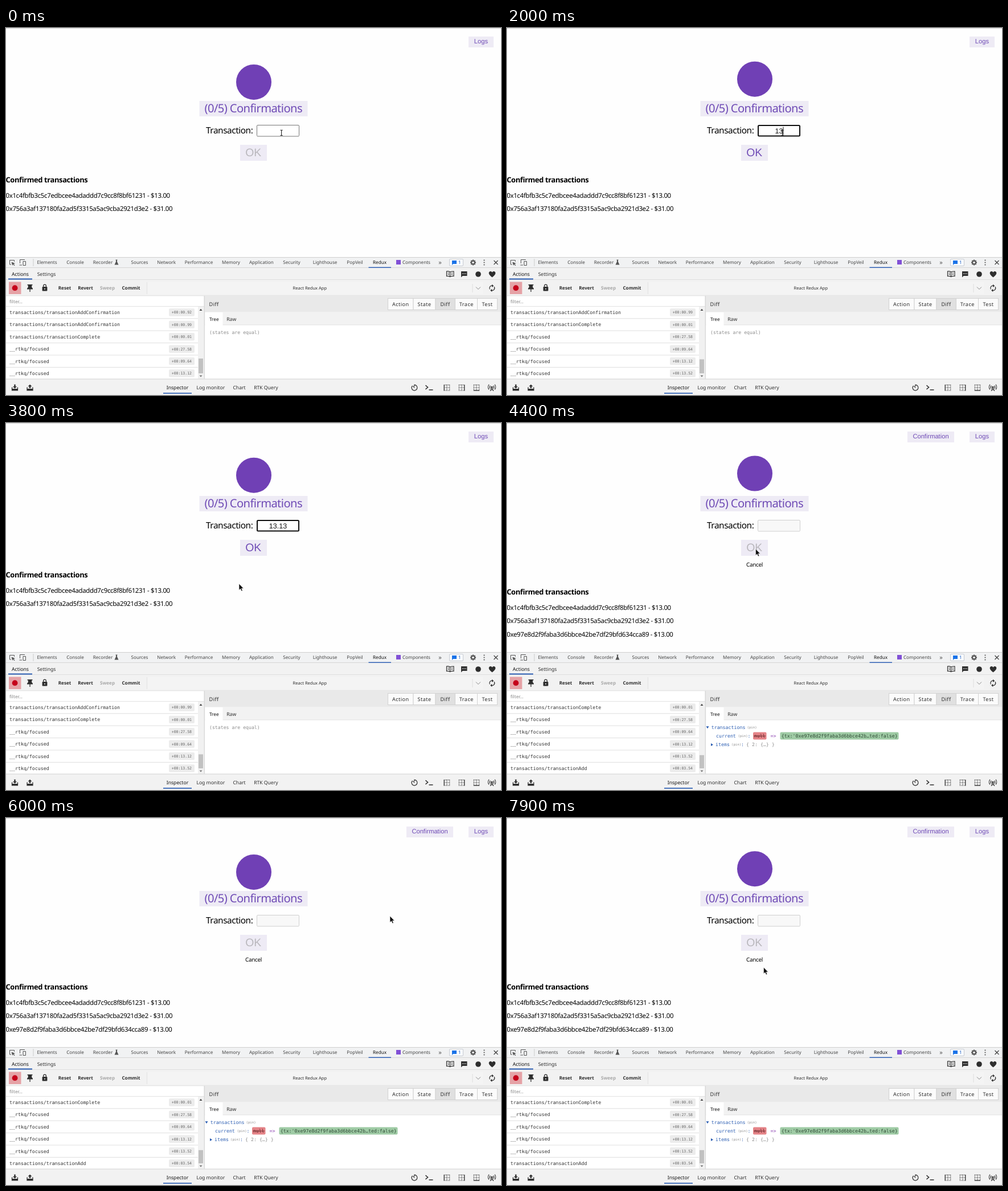
An HTML page that plays this animation: 869 px wide and 644 px high, repeating every 8 s.

```html
<!DOCTYPE html>
<html lang="en">
<head>
<meta charset="utf-8">
<title>Transaction confirmations</title>
<style>
  html, body { margin: 0; width: 100%; height: 100%; overflow: hidden; background: #fefefe; }
  svg { display: block; width: 869px; height: 644px; }
  text { font-family: "Noto Sans", "Open Sans", sans-serif; text-rendering: geometricPrecision; white-space: pre; }
  .mono { font-family: "DejaVu Sans Mono", "Noto Sans Mono", monospace; }
  .arial { font-family: "Liberation Sans", Arial, sans-serif; }
  .bold { font-weight: 700; }
  .wide { letter-spacing: .45px; }
  .tight { letter-spacing: -.03em; }
  .line { fill: none; stroke: #2e2e2e; stroke-width: 1.2; }
</style>
</head>
<body>
<svg id="stage" viewBox="0 0 869 644" xmlns="http://www.w3.org/2000/svg"></svg>
<script>
const LOOP = 8000, STEP = 100, ROW = 21.4;
const PURPLE = '#704cb6', LILAC = '#eeebf5', DARK = '#2e2e2e', BLUE = '#2d5fb3', BAR = '#f2f2f2';

const box = (x, y, w, h, fill, extra = '') =>
  `<rect x="${x}" y="${y}" width="${w}" height="${h}" fill="${fill}" ${extra}/>`;
const path = (d, extra = 'class="line"') => `<path d="${d}" ${extra}/>`;
const solid = (d, fill = DARK) => path(d, `fill="${fill}"`);
const dot = (x, y, r, fill = DARK, extra = '') => `<circle cx="${x}" cy="${y}" r="${r}" fill="${fill}" ${extra}/>`;
const at = (x, y, body) => `<g transform="translate(${x} ${y})">${body}</g>`;

// y is the middle of the capital letters
const label = (x, y, str, size, { fill = DARK, anchor = 'start', cls = '', extra = '' } = {}) =>
  `<text x="${x}" y="${(y + size * .36).toFixed(2)}" font-size="${size}" fill="${fill}" text-anchor="${anchor}" class="${cls}" ${extra}>${str}</text>`;
const mid = (x, y, str, size, opts = {}) => label(x, y, str, size, { anchor: 'middle', ...opts });
const mono = (x, y, str, size = 8.27, fill = '#333') => label(x, y, str, size, { fill, cls: 'mono' });
const arial = (x, y, str, size, fill, extra = '') => mid(x, y, str, size, { fill, cls: 'arial', extra });
const tight = (x, y, str, size, fill = '#000', cls = '') => label(x, y, str, size, { fill, cls: 'tight ' + cls });

function page() {
  const item = (y, str) => tight(-.5, y, str, 11.45);
  return box(0, 0, 869, 1.2, '#dcdcdc')
    + box(812, 15, 44, 19, LILAC) + arial(834, 23.2, 'Logs', 11.2, PURPLE)
    + dot(435, 95, 31, '#7040b5', 'id="logo"')
    + box(339.5, 128, 190, 27, LILAC)
    + tight(348.5, 140.4, '(0/5) Confirmations', 20.2, PURPLE)
    + tight(351, 179.2, 'Transaction:', 15.4)
    + box(440.5, 170.5, 74, 19.5, '#fff', 'id="field" rx="1.5"')
    + arial(477.5, 180.3, '', 12.5, '#111', 'id="value"')
    + box(0, 173.5, 1, 14, '#111', 'id="caret"')
    + box(411, 205, 47, 28, LILAC)
    + arial(434.3, 218, 'OK', 19.4, PURPLE, 'id="ok"')
    + `<g id="pending">${box(703, 15, 82, 19, LILAC)}${arial(744, 23.2, 'Confirmation', 11.15, PURPLE)}`
    + tight(420, 248.4, 'Cancel', 9.9)
    + item(370.7, '0xe97e8d2f9faba3d6bbce42be7df29bfd634cca89 - $13.00') + '</g>'
    + '<g id="list">' + tight(-.5, 266.3, 'Confirmed transactions', 12.95, '#000', 'bold')
    + item(293.6, '0x1c4fbfb3c5c7edbcee4adaddd7c9cc8f8bf61231 - $13.00')
    + item(317.1, '0x756a3af137180fa2ad5f3315a5ac9cba2921d3e2 - $31.00') + '</g>';
}

function tabBar() {
  const tabs = [['Elements', 72], ['Console', 121.5], ['Recorder', 170], ['Sources', 234.5], ['Network', 281.7],
    ['Performance', 338.5], ['Memory', 395], ['Application', 448.3], ['Security', 501.5], ['Lighthouse', 560],
    ['PopVeil', 612.5], ['Redux', 656], ['Components', 720.5]];
  const teeth = [...Array(8).keys()].map(i => `<rect x="-1.1" y="-5" width="2.2" height="3" fill="#555" transform="rotate(${i * 45})"/>`).join('');
  return box(0, 402, 869, 19, '#f1f2f3') + box(0, 402, 869, 1, '#cfcfcf') + box(0, 420, 869, 1, '#d5d5d5')
    + tabs.map(([name, x]) => mid(x, 411.2, name, 8.15, { fill: name === 'Redux' ? '#111' : '#444' })).join('')
    + box(636.5, 419.5, 39.5, 1.5, BLUE)
    + path('M9 415H6.5V407.5H14.5V410', 'fill="none" stroke="#555"') + solid('M9.5 410.5L16 413L13.4 414L15.5 416.4L14.6 417.2L12.4 414.8L11.3 417Z', '#555')
    + path('M24.5 413V406.5H33M23.5 416H28M30 409.5H34.5V416.5H30Z', 'fill="none" stroke="#555"')
    + box(47.5, 405, 1, 13, '#ccc')
    + solid('M192.5 406.5H195.5V407.5H195V410L197.5 415.5H190.5L193 410V407.5H192.5Z', '#555')
    + box(685, 407, 8, 8, '#8150d6')
    + mid(762, 410.6, '»', 11, { fill: '#555' })
    + box(778.5, 405.5, 24, 12, '#f7f9fc', 'stroke="#c8ccd2" rx="1.5"')
    + solid('M783 408H791V414H785L783 416Z', '#1a73e8') + label(794, 411.5, '1', 8, { fill: '#1a5fc4' })
    + at(820, 411.5, teeth + dot(0, 0, 2.8, 'none', 'stroke="#555" stroke-width="1.8"'))
    + [407.5, 411.5, 415.5].map(y => dot(839.5, y, 1.1, '#555')).join('')
    + path('M856.5 408L863.5 415M863.5 408L856.5 415', 'stroke="#444" stroke-width="1.3"');
}

function toolBars() {
  const bold = (x, str, fill = DARK) => mid(x, 456, str, 8.1, { fill, cls: 'bold' });
  return box(0, 421, 869, 49, BAR) + box(0, 441, 869, 1, '#dedede')
    + mid(25, 432, 'Actions', 8.7, { fill: '#111' }) + mid(71, 432, 'Settings', 8.6) + box(4, 439.5, 42, 2, BLUE)
    + path('M779.5 428V436.5M779.5 428C777 426.5 775 427 773.5 427V435.5C776 435 778 435.5 779.5 436.5C781 435.5 783 435 786 435.5V427C783 427 781.5 427 779.5 428M775.5 430H778M775.5 432.5H778M781.5 430H784M781.5 432.5H784')
    + solid('M799 427H809.5V435H801.5L799 437.5Z') + [801, 803.6, 806.2].map(x => box(x, 430.4, 1.3, 1.3, '#fff')).join('')
    + dot(829, 432, 4.8)
    + solid('M853.5 437.5C849 434 847.7 432 847.7 430C847.7 426.5 852 425.8 853.5 428.8C855 425.8 859.3 426.5 859.3 430C859.3 432 858 434 853.5 437.5Z')
    + box(5, 445.5, 21.5, 21.5, '#e5a2a6') + dot(15.6, 456.2, 4.9, '#c5001a')
    + solid('M37.5 450H46.5V451.5H45.2V455L47 457V458.5H42.7V463H41.4V458.5H37V457L38.8 455V451.5H37.5Z')
    + path('M65.6 454V452.8A2.4 2.6 0 0 1 70.4 452.8V454') + box(63.6, 454, 8.8, 7.5, DARK, 'rx="1"') + dot(68, 457.7, 1, BAR)
    + bold(103, 'Reset') + bold(139.5, 'Revert') + bold(178, 'Sweep', '#a8a8a8') + bold(219.5, 'Commit')
    + box(247, 446, 1, 21, '#e2e2e2') + box(248, 446, 589, 21, '#f4f4f4') + mid(533.3, 456.2, 'React Redux App', 7.5)
    + box(818.5, 449, 1, 15, '#ddd') + path('M825 454.5L829 458.5L833 454.5', 'fill="none" stroke="#888"')
    + path('M849.4 458.5A4.2 4.2 0 0 1 854 452.3M857 454A4.2 4.2 0 0 1 852.4 460.4') + solid('M853.2 449.8L856.2 452.4L853.2 455ZM853.2 457.8L850.2 460.4L853.2 463Z')
    + box(0, 469.5, 869, 1, '#dadada');
}

function actionList() {
  const add = 'transactions/transactionAddConfirmation', focus = '__rtkq/focused';
  const rows = [[add, '00.92'], [add, '00.99'], ['transactions/transactionComplete', '00.01'], [focus, '27.58'],
    [focus, '09.64'], [focus, '13.12'], [focus, '13.52'], ['transactions/transactionAdd', '03.54']];
  const row = ([name, time], i) => {
    const y = 499 + i * ROW;
    return mono(6, y, name) + box(286, y - 6.7, 45, 13.4, '#ececec', 'rx="2"')
      + mono(290.8, y, '+00:' + time, 6.5, '#666') + box(0, y + 10.3, 337, 1, '#dfdfdf');
  };
  return box(0, 470.5, 348, 145.5, '#fff') + label(6, 479.7, 'filter...', 8.1, { fill: '#888' }) + box(0, 488, 348, 1, '#e2e2e2')
    + '<clipPath id="clip"><rect x="0" y="489" width="337" height="127"/></clipPath>'
    + `<g clip-path="url(#clip)"><g id="rows">${rows.map(row).join('')}</g></g>`
    + box(337, 489, 10.5, 127, '#f1f1f1') + box(338, 580, 8, 26, '#c1c1c1', 'id="thumb"')
    + solid('M339.5 496L342 492.8L344.5 496Z', '#444') + solid('M339.5 609.5H344.5L342 612.5Z', '#777')
    + box(347.5, 470, 1.5, 146, '#d8d8d8');
}

function diffPanel() {
  const tabs = [['Action', 692.8], ['State', 734.5], ['Diff', 771], ['Trace', 808.3], ['Test', 845]];
  const edges = [670.5, 715, 754, 788.5, 827.5, 862.5];
  const pin = (x, y, str) => mono(x, y, str, 5.7, '#888');
  return box(349, 470.5, 520, 28, '#e9e9e9') + box(349, 498.5, 520, 23, BAR)
    + label(356.5, 484.5, 'Diff', 9.2, { cls: 'wide' })
    + tabs.map(([name, x], i) => box(edges[i], 474.5, edges[i + 1] - edges[i], 20, name === 'Diff' ? '#e0e0e0' : '#fbfbfb', 'stroke="#d2d2d2"')
      + mid(x, 484.6, name, 9.1, { cls: 'wide' })).join('')
    + box(349, 521, 520, 95, '#fff') + box(349, 520.5, 520, 1, '#e4e4e4') + box(349.5, 499, 31, 23, '#fff')
    + mid(365.3, 510.6, 'Tree', 8.3, { fill: '#111' }) + mid(395.7, 510.6, 'Raw', 8.7)
    + `<g id="equal">${mono(357, 534.5, '(states are equal)', 8.2, '#8c8c8c')}</g>`
    + '<g id="diff">' + solid('M349.5 532.2H354.5L352 536.2Z', BLUE) + mono(358.7, 534, 'transactions', 8.27, BLUE) + pin(421.5, 534.3, '(pin)')
    + mono(367, 549, 'current', 8.27, BLUE) + pin(405.5, 549.2, '(pin)') + mono(422.5, 549, ':', 8.27, BLUE)
    + box(432, 542.5, 23.5, 13, '#e58488', 'rx="2"') + mono(433.7, 549, 'null', 8.27, '#6b2b2e') + box(433.5, 548.7, 20.3, 1, '#6b2b2e')
    + mono(462.5, 549, '=&gt;', 8.27, '#8a3fb0')
    + box(479.5, 542.5, 208, 13, '#9fcba5', 'rx="2"') + mono(481.7, 549, "{tx:'0xe97e8d2f9faba3d6bbce42b…ted:false}", 8.27, '#2e4a34')
    + solid('M358 562L362 564.5L358 567Z', BLUE) + mono(366, 564, 'items', 8.27, BLUE) + pin(394, 564.3, '(pin)') + mono(411, 564, ':', 8.27, BLUE)
    + mono(420, 564, '{ 2: {…} }', 8.27, '#8c8c8c') + '</g>';
}

function bottomBar() {
  const tray = arrow => path('M-4 0H-5V5H5V0H4') + box(-5, 2, 10, 3, DARK) + solid(arrow);
  const grid = bar => path('M-4.7 -5V5.5M0 -5V5.5M4.7 -5V5.5M-5 -4.7H5M-5 0H5M-5 5H5', `fill="none" stroke="${DARK}" stroke-width="1.2" stroke-dasharray="1.2 1.2"`) + path(bar);
  return box(0, 615.5, 869, 29, BAR) + box(0, 615.5, 869, 1, '#d6d6d6')
    + at(15.5, 631, tray('M-1.2 -5.5H1.2V-2H3.5L0 1.5L-3.5 -2H-1.2Z')) + at(42, 631, tray('M-1.2 1H1.2V-2H3.5L0 -5.5L-3.5 -2H-1.2Z'))
    + mid(301, 631.2, 'Inspector', 8.6, { fill: '#111' }) + mid(359.3, 631.2, 'Log monitor', 8.6)
    + mid(409.5, 631.2, 'Chart', 8.6) + mid(456.4, 631.2, 'RTK Query', 8.6) + box(276, 640, 50, 1.7, BLUE)
    + path('M717 629V626.2A4.9 4.9 0 1 1 713.3 627.9M714.2 628.2L717.3 631.3')
    + path('M736.5 627L740.5 630.5L736.5 634M742.5 635H749.5', `fill="none" stroke="${DARK}" stroke-width="1.6"`)
    + at(774, 631, grid('M-4.7 -5V5.5')) + at(800, 631, grid('M4.7 -5V5.5')) + at(826, 631, grid('M-5 5H5'))
    + at(853, 630, dot(0, 0, 1.6) + path('M0 1L-2.8 7M0 1L2.8 7M-1.8 5H1.8M-2.8 -2.5A4 4 0 0 0 -2.8 2.5M2.8 -2.5A4 4 0 0 1 2.8 2.5M-5 -4.3A6.5 6.5 0 0 0 -5 4.3M5 -4.3A6.5 6.5 0 0 1 5 4.3'));
}

const pointers = '<g id="beam">' + path('M481.5 179.3H485.7M481.5 188.5H485.7M483.6 179.3V188.5', 'stroke="#222" stroke-width="1.1"') + '</g>'
  + path('M0 0V11.3L2.6 8.9L4.4 13L6.3 12.2L4.6 8.2H8Z', 'id="arrow" fill="#111" stroke="#fff" stroke-width=".6"');

const stage = document.getElementById('stage');
stage.innerHTML = page() + tabBar() + toolBars() + actionList() + diffPanel() + bottomBar() + pointers;
const ui = {};
stage.querySelectorAll('[id]').forEach(el => ui[el.id] = el);

const set = (el, attrs) => { for (const k in attrs) el.setAttribute(k, attrs[k]); };
const show = (el, on) => set(el, { visibility: on ? 'visible' : 'hidden' });

const HOVER = 800, FOCUS = 900, LEAVE = 3500, SUBMIT = 4400;
const typed = [[FOCUS, ''], [1400, '1'], [1600, '13'], [2300, '13.'], [2500, '13.1'], [3000, '13.13']];
const trail = [[3500, 458, 203], [3600, 440, 219], [3700, 417, 264], [3800, 409, 282], [3900, 410, 279], [4100, 429, 233],
  [4200, 436.5, 221], [5400, 436.5, 221], [5600, 500, 209], [5800, 620, 184], [6000, 674, 172], [6300, 632, 171],
  [6800, 613, 175.5], [6900, 608, 179], [7200, 505, 247], [7400, 462, 261], [7600, 450.5, 262]];

function pointerAt(t) {
  const i = trail.findIndex(p => p[0] > t);
  if (i < 0) return trail[trail.length - 1].slice(1);
  if (i === 0) return trail[0].slice(1);
  const [a, b] = [trail[i - 1], trail[i]], k = (t - a[0]) / (b[0] - a[0]);
  return [a[1] + (b[1] - a[1]) * k, a[2] + (b[2] - a[2]) * k];
}

function floatY(t) {
  const p = Math.abs(((t - 60 + 3000) % 3000) / 1500 - 1); // 1 at the bottom, 0 at the top
  return 88.3 + 6.7 * p * p * (3 - 2 * p);
}

function draw(t) {
  const sent = t >= SUBMIT, focused = t >= FOCUS && !sent;
  const [since, value] = focused ? typed.filter(k => k[0] <= t).pop() : [0, ''];
  set(ui.logo, { cy: floatY(t) });

  // the border grows inwards
  const border = focused ? 2 : 1;
  set(ui.field, {
    x: 440 + border / 2, y: 170 + border / 2, width: 75 - border, height: 20.5 - border,
    fill: sent ? '#f8f8f8' : '#fff',
    stroke: sent ? '#cfcfcf' : focused ? '#101010' : t >= HOVER ? '#3c3c3c' : '#767676',
    'stroke-width': border
  });
  ui.value.textContent = value;
  const width = [...value].reduce((w, c) => w + (c === '.' ? .278 : .556), 0) * 12.5;
  set(ui.caret, { x: 477.5 + width / 2 });
  show(ui.caret, focused && (t - since) % 1000 < 500);
  set(ui.ok, { fill: value ? PURPLE : '#b9b7bc' });

  show(ui.pending, sent);
  set(ui.list, { transform: `translate(0 ${sent ? 30.2 : 0})` });
  show(ui.equal, !sent);
  show(ui.diff, sent);

  const extra = (t >= FOCUS) + sent;
  set(ui.rows, { transform: `translate(0 ${-ROW * extra})` });
  set(ui.thumb, { y: 580 + 1.4 * extra, height: 26 - 1.4 * extra });

  show(ui.beam, t < LEAVE);
  show(ui.arrow, t >= LEAVE);
  set(ui.arrow, { transform: `translate(${pointerAt(t)})` });
}

const start = performance.now();
function tick() {
  const t = (performance.now() - start) % LOOP;
  draw(Math.floor(t / STEP) * STEP);
  requestAnimationFrame(tick);
}
tick();
</script>
</body>
</html>
```
